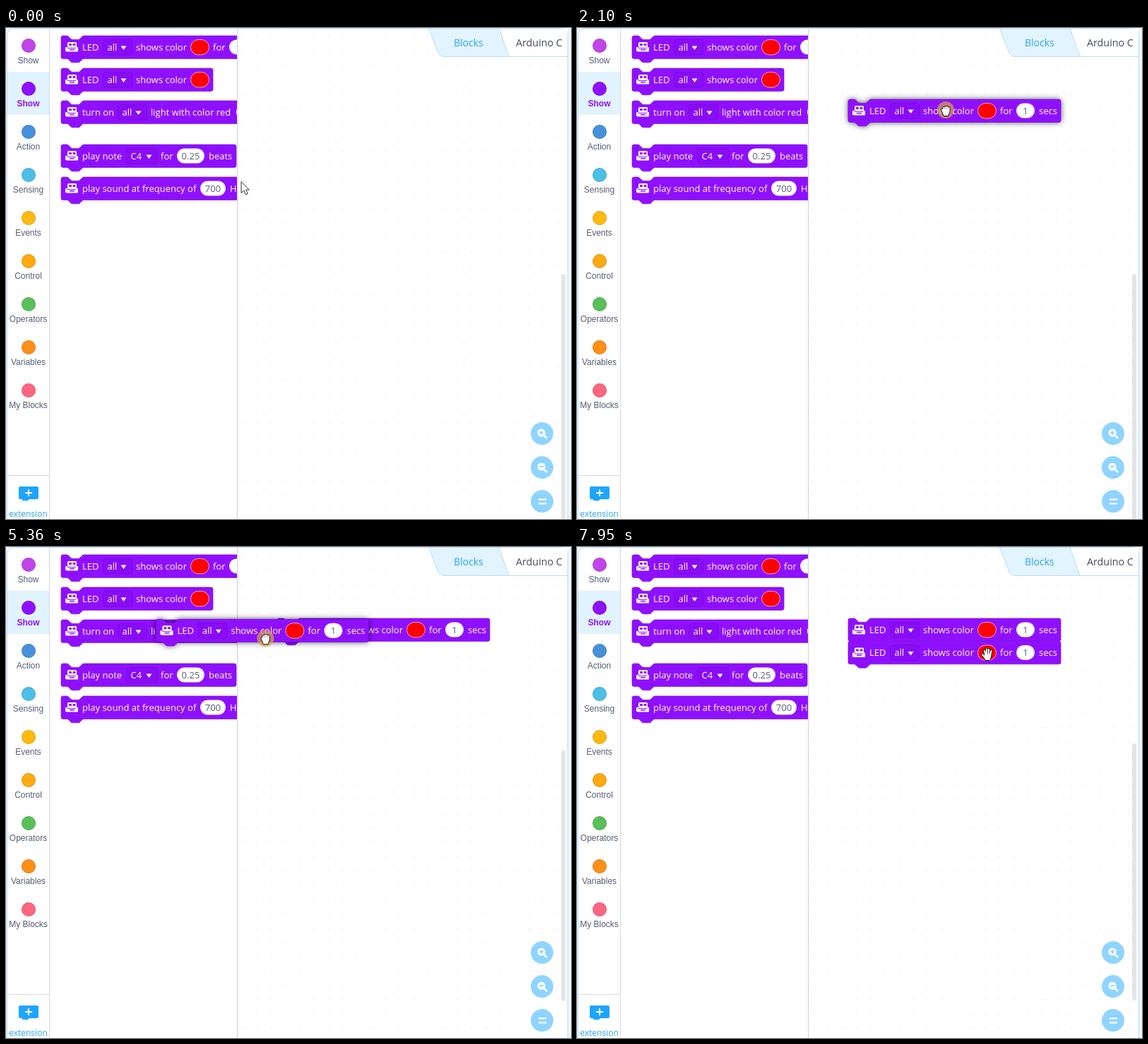
Recreate the animation shown at these times as an HTML page with a canvas. Size 800 by 695 pixels, loop 8000 ms.

```html
<!DOCTYPE html>
<html lang="en">
<head>
<meta charset="utf-8">
<title>Block editor</title>
<style>
  html, body { margin: 0; width: 800px; height: 695px; overflow: hidden; }
  canvas { display: block; }
</style>
</head>
<body>
<canvas id="stage" width="800" height="695"></canvas>
<script>
const ctx = document.getElementById('stage').getContext('2d');
const LOOP = 8000;
const PURPLE = '#8f10ff', EDGE = '#7a0bdd', INK = '#575e75', BLUE = '#b9dcfa';
const UI = '"Open Sans", "Noto Sans", sans-serif';
const LABEL = '"Liberation Sans", Arial, sans-serif';

// Parts: [kind, x, text or width, text]; x is relative to the block.
const ledStart = [['text', 30, 'LED'], ['menu', 59, 41, 'all'], ['text', 106, 'shows color'], ['color', 183, 27]];
const led = { w: 301, parts: [...ledStart, ['text', 215, 'for'], ['num', 238, 26, '1'], ['text', 270, 'secs']] };
const palette = [
  { y: 11, ...led },
  { y: 57, w: 215, parts: ledStart },
  { y: 103, w: 427, parts: [['text', 30, 'turn on'], ['menu', 80, 41, 'all'], ['text', 127, 'light with color red'],
    ['num', 248, 36, '255'], ['text', 290, 'green'], ['num', 330, 27, '0'], ['text', 363, 'blue'], ['num', 394, 27, '0']] },
  { y: 165, w: 248, parts: [['text', 30, 'play note'], ['menu', 92, 44, 'C4'], ['text', 141, 'for'],
    ['num', 164, 39, '0.25'], ['text', 209, 'beats']] },
  { y: 211, w: 345, parts: [['text', 30, 'play sound at frequency of'], ['num', 197, 36, '700'],
    ['text', 239, 'Hz for'], ['num', 281, 27, '1'], ['text', 314, 'secs']] },
];
const categories = [['Show', '#c044e8'], ['Show', PURPLE], ['Action', '#4791dc'], ['Sensing', '#4cbfe9'],
  ['Events', '#ffb90f'], ['Control', '#ffa914'], ['Operators', '#59c059'], ['Variables', '#ff8f17'], ['My Blocks', '#ff6680']];

// Motion keys: [time, x, y]
const pointerKeys = [[80, 333, 217], [230, 290, 180], [620, 290, 180], [780, 225, 14], [860, 208, 26], [1250, 208, 26],
  [1490, 346, 52], [1750, 458, 94], [2040, 522, 116], [3110, 522, 116], [3490, 280, 121], [3730, 280, 121],
  [4500, 198, 26], [5120, 198, 27], [5360, 367, 129], [5600, 452, 170], [5910, 485, 183], [5980, 485, 183],
  [6070, 479, 183], [6220, 479, 183], [6550, 502, 171], [6700, 504, 169], [6770, 504, 169], [7160, 508, 160],
  [7390, 508, 160], [7480, 634, 193], [7710, 634, 193], [7950, 581, 152]];
const firstDrag = [[1260, 78, 11], [1490, 171, 31], [1750, 308, 78], [2100, 384, 101]];
const secondDrag = [[5120, 78, 11], [5360, 212, 102], [5600, 316, 154], [5910, 357, 169], [5980, 357, 169],
  [6070, 351, 169], [6220, 351, 169], [6550, 374, 157], [6700, 376, 155]];

const within = (t, a, b) => t >= a && t < b;

function at(keys, t) {
  const i = keys.findIndex(k => k[0] > t);
  if (i === 0) return keys[0].slice(1);
  if (i < 0) return keys[keys.length - 1].slice(1);
  const [a, b] = [keys[i - 1], keys[i]], f = (t - a[0]) / (b[0] - a[0]);
  return [a[1] + (b[1] - a[1]) * f, a[2] + (b[2] - a[2]) * f];
}

function text(str, x, y, color, font, align = 'left') {
  ctx.font = font;
  ctx.textAlign = align;
  ctx.fillStyle = color;
  ctx.fillText(str, x, y);
}

function line(color, width, ...points) {
  ctx.beginPath();
  points.forEach(p => ctx.lineTo(...p));
  ctx.strokeStyle = color;
  ctx.lineWidth = width;
  ctx.stroke();
}

function rect(x, y, w, h, r, fill, stroke) {
  ctx.beginPath();
  ctx.roundRect(x, y, w, h, r);
  if (fill) { ctx.fillStyle = fill; ctx.fill(); }
  if (stroke) { ctx.strokeStyle = stroke; ctx.lineWidth = 1; ctx.stroke(); }
}

function disc(x, y, r, fill, stroke) {
  rect(x - r, y - r, 2 * r, 2 * r, r, fill, stroke);
}

function blockShape(w) {
  const s = 0.675, right = w / s;
  const p = new Path2D(`M0 4A4 4 0 0 1 4 0H12c2 0 3 1 4 2l4 4c1 1 2 2 4 2h12c2 0 3-1 4-2l4-4c1-1 2-2 4-2
    H${right - 4}a4 4 0 0 1 4 4v40a4 4 0 0 1-4 4H48c-2 0-3 1-4 2l-4 4c-1 1-2 2-4 2h-12c-2 0-3-1-4-2l-4-4
    c-1-1-2-2-4-2H4a4 4 0 0 1-4-4z`);
  const scaled = new Path2D();
  scaled.addPath(p, new DOMMatrix([s, 0, 0, s, 0, 0]));
  return scaled;
}

function robot() {
  rect(9, 9, 13, 8, 1.5, '#fff');
  rect(11, 11, 4, 3, 1, PURPLE);
  rect(16.5, 11, 4, 3, 1, PURPLE);
  rect(7, 18, 17, 4.5, 1.5, '#fff');
  rect(12, 19, 7, 1.5, 0, PURPLE);
  rect(6, 16, 3, 6, 1, '#fff');
  rect(21, 16, 3, 6, 1, '#fff');
}

const drawPart = {
  text: (x, str) => text(str, x, 21, '#fff', `500 13px ${UI}`),
  menu(x, w, str) {
    rect(x + .5, 5.5, w, 21.5, 3, '#890cf5', EDGE);
    text(str, x + 6.5, 21, '#fff', `500 13px ${UI}`);
    const cx = x + w - 12;
    ctx.beginPath();
    ctx.moveTo(cx - 3.5, 14.5);
    ctx.lineTo(cx + 4.5, 14.5);
    ctx.lineTo(cx + .5, 20);
    ctx.fill();
  },
  color: (x, w) => rect(x + .5, 5.5, w - 1, 21.5, 10.7, '#f00', '#e0a4c4'),
  num(x, w, str) {
    rect(x, 5.5, w, 21, 10.5, '#fff');
    text(str, x + w / 2, 21, INK, `13px ${UI}`, 'center');
  },
};

function block({ w, parts }, x, y, lifted) {
  const shape = blockShape(w);
  ctx.save();
  ctx.translate(x, y);
  ctx.save();
  if (lifted) { ctx.shadowColor = 'rgba(0,0,0,.7)'; ctx.shadowBlur = 9; }
  ctx.fillStyle = PURPLE;
  ctx.fill(shape);
  ctx.restore();
  ctx.strokeStyle = EDGE;
  ctx.lineWidth = .7;
  ctx.stroke(shape);
  robot();
  parts.forEach(([kind, ...args]) => drawPart[kind](...args));
  ctx.restore();
}

function workspace(t) {
  ctx.fillStyle = '#e2e2e4';
  for (let x = 334; x < 784; x += 20.25)
    for (let y = 12; y < 695; y += 20.25) ctx.fillRect(Math.round(x), Math.round(y), 1.3, 1.3);

  if (within(t, 6300, 6770)) {
    ctx.save();
    ctx.translate(384, 133.4);
    ctx.fillStyle = '#c9c9c9';
    ctx.fill(blockShape(led.w));
    ctx.restore();
  }
  if (t >= 2770) block(led, 384, 101);
  if (t >= 6770) block(led, 384, 133.4);

  const [top, bottom] = t < 2770 ? [348, 695] : t < 6770 ? [288, 643] : [278, 642];
  rect(786, top, 6, bottom - top, 3, '#e4e4e4');

  [574, 622, 670].forEach((y, i) => {
    disc(759, y, 16, '#8fd4ff');
    if (i === 2) {
      rect(754, y - 4, 11, 2.4, 0, '#fff');
      rect(754, y + 2, 11, 2.4, 0, '#fff');
      return;
    }
    line('#fff', 2.6, [761, y + 2], [766, y + 7]);
    disc(758, y - 1, 5.6, '#fff');
    rect(755, y - 2, 6, 1.8, 0, '#8fd4ff');
    if (i === 0) rect(757.1, y - 4, 1.8, 6, 0, '#8fd4ff');
  });
}

function tabs() {
  const tab = new Path2D('M598.5 .5L611 33Q614 40.5 621 40.5H712L698 .5Z');
  rect(614, 1, 181, 39, 0, '#fff');
  ctx.fillStyle = '#e2f4ff';
  ctx.fill(tab);
  ctx.strokeStyle = BLUE;
  ctx.lineWidth = 1;
  ctx.stroke(tab);
  line(BLUE, 1, [712, 40.5], [795, 40.5]);
  text('Blocks', 634, 26, '#2ba4fb', `14px ${UI}`);
  text('Arduino C', 722, 26, '#454b5e', `14.3px ${UI}`);
}

function sidebar() {
  rect(2, 62, 59, 61, 0, '#e1f3ff');
  categories.forEach(([name, color], i) => {
    const y = 25 + 61 * i, active = i === 1;
    disc(32, y, 10, color);
    disc(32, y, 9.5, null, 'rgba(0,0,0,.13)');
    text(name, 31.5, y + 25, active ? PURPLE : INK, `${active ? 'bold ' : ''}12px ${LABEL}`, 'center');
  });
  line('#dcdcdc', 1, [2, 633.5], [61, 633.5]);
  rect(18, 649, 28, 18, 2, '#1ea5ff');
  rect(23, 666, 9, 3, 1, '#1ea5ff');
  rect(27, 657, 10, 2, 0, '#fff');
  rect(31, 653, 2, 10, 0, '#fff');
  text('extension', 31.5, 692, '#2ba4fb', `12px ${UI}`, 'center');
  line('#d6d9dc', 1, [61.5, 1], [61.5, 695]);
}

function flyout(open) {
  line('#cfcfcf', 1, [327.5, 1], [327.5, 695]);
  ctx.save();
  ctx.beginPath();
  ctx.rect(62, 0, open ? 700 : 265, 695);
  ctx.clip();
  palette.forEach(b => block(b, 78, b.y));
  ctx.restore();
}

function trash() {
  rect(2, 1, 325.5, 694, [9, 0, 0, 0], 'rgba(0,0,0,.21)');
  rect(149, 343, 32, 33.5, 2, '#fff');
  [157, 165, 173].forEach(x => line('#c4c4c4', 2, [x, 347], [x, 371]));
  line('#fff', 5, [145.5, 339.5], [182, 334]);
  line('#fff', 2.5, [157, 337], [158, 332.5], [167, 331], [169, 335]);
}

function arrow(x, y) {
  const p = new Path2D('M0 0V16L4 12.5L6.5 18.5L9.3 17.3L6.8 11.5H11.5Z');
  ctx.save();
  ctx.translate(x, y + .5);
  ctx.fillStyle = '#fff';
  ctx.fill(p);
  ctx.strokeStyle = '#333';
  ctx.lineWidth = 1;
  ctx.stroke(p);
  ctx.restore();
}

function hand(x, y, pressed) {
  if (pressed) disc(x, y, 12, 'rgba(214,164,72,.72)');
  ctx.save();
  ctx.translate(x, y);
  ctx.lineCap = ctx.lineJoin = 'round';
  const fingers = new Path2D(pressed
    ? 'M-3-3V2M-.5-4V2M2-4V2M4.5-3V2M-5 0L-2 5'
    : 'M-4-5L-2 2M-1-7.5V1M2-7V1M5.5-5L4 2M-7 0L-2 6');
  const palm = new Path2D('M-3 0H4.5V3L3 7.5H-2L-4 3Z');
  for (const [color, width] of [['#111', 4], ['#fff', 2.2]]) {
    ctx.strokeStyle = ctx.fillStyle = color;
    ctx.lineWidth = width;
    ctx.stroke(fingers);
    ctx.lineWidth = width - 1;
    ctx.stroke(palm);
    ctx.fill(palm);
  }
  ctx.restore();
}

function draw(t) {
  ctx.fillStyle = '#edf6fe';
  ctx.fillRect(0, 0, 800, 695);
  rect(1.5, .5, 794, 710, 10, '#fff', BLUE);
  workspace(t);
  tabs();
  sidebar();
  flyout(within(t, 150, 1300) || within(t, 3416, 5180));
  if (within(t, 1300, 1560) || within(t, 5180, 5340)) trash();
  if (within(t, 1260, 2770)) block(led, ...at(firstDrag, t), true);
  if (within(t, 5120, 6770)) block(led, ...at(secondDrag, t), true);

  const pointer = at(pointerKeys, t);
  if (t < 130 || within(t, 3330, 3416) || within(t, 7440, 7880)) arrow(...pointer);
  else hand(...pointer, within(t, 1250, 2770) || within(t, 4970, 6770));
}

const start = performance.now();
(function tick() {
  draw((performance.now() - start) % LOOP);
  requestAnimationFrame(tick);
})();
</script>
</body>
</html>
```
